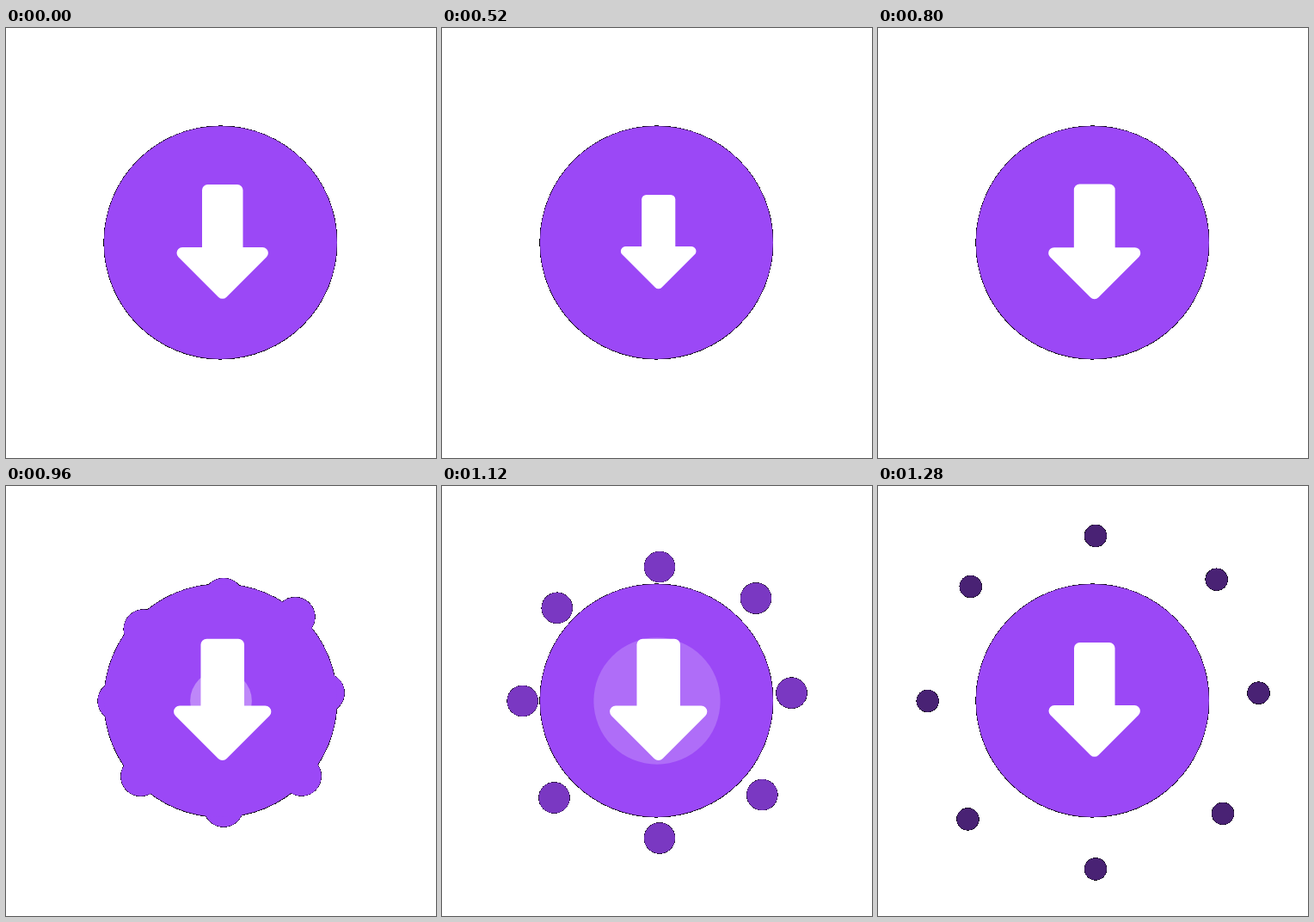
Write an HTML page that moves like this. It is 500 px wide and 500 px high and loops after 1.32 s.

```html
<!DOCTYPE html>
<html lang="en">
<head>
<meta charset="utf-8">
<title>Download button</title>
<style>
  html, body { margin: 0; width: 100%; height: 100%; overflow: hidden; background: #fff; }
  svg { display: block; width: 100vw; height: 100vh; }
  #rims { fill: #000; shape-rendering: crispEdges; }
  #dots, #disc { fill: #9b48f6; }
  #ripple, #arrow { fill: #fff; }
  #arrow path { stroke: #fff; stroke-width: 13; stroke-linejoin: round; }
</style>
</head>
<body>
<svg viewBox="0 0 500 500">
  <g id="rims"><circle cx="249.4" cy="249.5" r="136.1"/></g>
  <g id="dots"></g>
  <circle id="disc" cx="249.4" cy="249.4" r="135.5"/>
  <circle id="ripple" cx="250" cy="250"/>
  <g id="arrow">
    <rect x="228" y="182" width="47.5" height="90" rx="6.5"/>
    <path d="M205 261.6H298.4L251.7 308.3Z"/>
  </g>
</svg>
<script>
const LOOP = 1320, STEP = 40;
const SPEED = 36 / 160, SHRINK = 5.1 / 160;
const $ = id => document.getElementById(id);

function addCircle(parent) {
  const c = document.createElementNS("http://www.w3.org/2000/svg", "circle");
  return parent.appendChild(c);
}

function place(c, x, y, r) {
  c.setAttribute("cx", x);
  c.setAttribute("cy", y);
  c.setAttribute("r", Math.max(0, r));
}

// Eight headings, 45 degrees apart; the right-hand diagonals lean to the axis
function heading(i) {
  const a = i * Math.PI / 4;
  return a - 0.08 * Math.sin(2 * a) * (1 + Math.cos(a));
}

// Where each dot is at 1120 ms, clockwise from the right
const dots = [
  [406.5, 240.7], [372.3, 359.1], [253, 409.4], [130.5, 362.5],
  [93.7, 250], [133.8, 141.8], [253, 94], [365, 130.5]
].map(([x, y], i) => ({
  x, y, angle: heading(i), rim: addCircle($("rims")), fill: addCircle($("dots"))
}));

function arrowScale(t) {
  if (t <= 560) return 1 - 0.19 * t / 560;
  if (t <= 1040) return 1.072 - 0.262 * ((1040 - t) / 480) ** 2;
  return 1.072 - 0.072 * ((t - 1040) / 240) ** 2;
}

function drawDots(t) {
  const dt = t - 1120;
  const r = t >= 800 ? 18 - SHRINK * dt : 0;
  for (const { x, y, angle, rim, fill } of dots) {
    const px = x + SPEED * dt * Math.cos(angle);
    const py = y + SPEED * dt * Math.sin(angle);
    place(rim, px, py, r && r + 0.4);
    place(fill, px, py, r);
  }
  // Dots darken as their fill fades over the black rim
  $("dots").setAttribute("opacity", Math.min(1, 1 - (t - 1015) * 0.002));
}

function drawRipple(t) {
  const shown = t > 808 && t < 1280;
  place($("ripple"), 250, 250, shown ? (t - 808) * 0.236 : 0);
  $("ripple").setAttribute("opacity", shown ? (1340 - t) / 1100 : 0);
}

function draw(t) {
  $("arrow").setAttribute("transform",
    `translate(251.7 249.5) scale(${arrowScale(t)}) translate(-251.7 -249.5)`);
  drawDots(t);
  drawRipple(t);
}

function tick() {
  const t = performance.now() % LOOP;
  draw(Math.floor(t / STEP) * STEP);
  requestAnimationFrame(tick);
}
tick();
</script>
</body>
</html>
```
